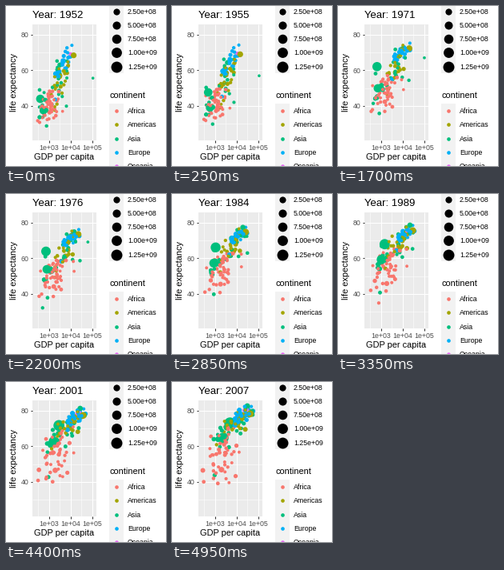
A matplotlib script that plays this animation: 200x200 px, repeating every 5000 ms.

```python
import numpy as np
import matplotlib.pyplot as plt
from matplotlib.animation import FuncAnimation
from matplotlib.patches import Rectangle

plt.rcParams["font.family"] = "Liberation Sans"

SIZE, DPI = 200, 100
PT = 72 / DPI                        # points per pixel
FRAMES, INTERVAL = 100, 50
YEARS = np.arange(1952, 2008, 5)
LEFT, RIGHT, TOP, BOTTOM = 33.3, 112.8, 23.4, 168.1
COLOURS = {"Africa": "#F8766D", "Americas": "#A3A500", "Asia": "#00BF7D",
           "Europe": "#00B0F6", "Oceania": "#E76BF3"}
POP_MIN, POP_MAX = 0.06, 1318.7      # millions

# Countries with an uneven course: GDP and life expectancy every five years,
# then the first and last population in millions.
PATHS = {
    "China": ("Asia",
              [400, 576, 488, 613, 677, 741, 962, 1379, 1656, 2289, 3119, 4959],
              [44, 50.5, 44.5, 58.4, 63.1, 64, 65.5, 67.3, 68.7, 70.4, 72, 73],
              556, 1318.7),
    "India": ("Asia",
              [547, 590, 658, 701, 724, 813, 856, 977, 1164, 1459, 1747, 2452],
              [37.4, 40.2, 43.6, 47.2, 50.7, 54.2, 56.6, 58.6, 60.2, 61.8, 62.9, 64.7],
              372, 1110),
    "Kuwait": ("Asia",
               [108382, 113523, 95458, 80895, 109348, 59265, 31354, 28118,
                34933, 40301, 35110, 47307],
               [55.6, 58, 60.5, 64.6, 67.7, 69.3, 71.3, 74.2, 75.2, 76.2, 76.9, 77.6],
               0.16, 2.5),
    "Cambodia": ("Asia",
                 [368, 434, 497, 523, 422, 525, 624, 684, 682, 734, 896, 1714],
                 [39.4, 41.4, 43.4, 45.4, 40.3, 31.2, 51, 53.9, 55.8, 56.5, 56.8, 59.7],
                 4.7, 14),
    "Rwanda": ("Africa",
               [493, 540, 597, 511, 591, 670, 882, 848, 737, 590, 786, 863],
               [40, 41.5, 43, 44.1, 44.6, 45, 46.2, 44, 23.6, 36.1, 43.4, 46.2],
               2.5, 8.9),
}

# Steadier countries: GDP and life expectancy in 1952, 1980 and 2007, population.
STEADY = {
    "Afghanistan": ("Asia", [779, 880, 975], [28.8, 39.2, 43.8], 8.4, 32),
    "Bangladesh": ("Asia", [684, 670, 1391], [37.5, 49, 64], 47, 150),
    "Indonesia": ("Asia", [750, 1450, 3541], [37.5, 55, 70.6], 82, 224),
    "Iraq": ("Asia", [4130, 14600, 4471], [45.3, 61.3, 59.5], 5.4, 27),
    "Japan": ("Asia", [3217, 18300, 31656], [63, 76.5, 82.6], 86, 127),
    "Pakistan": ("Asia", [685, 1350, 2606], [43.4, 55.5, 65.5], 41, 169),
    "Saudi Arabia": ("Asia", [6460, 33800, 21655], [39.9, 61.4, 72.8], 4, 28),
    "Singapore": ("Asia", [2315, 13500, 47143], [60.4, 71.4, 80], 1.1, 4.6),
    "Brazil": ("Americas", [2108, 6900, 9066], [50.9, 62.7, 72.4], 57, 190),
    "Haiti": ("Americas", [1840, 1950, 1202], [37.6, 51, 60.9], 3.2, 8.5),
    "Mexico": ("Americas", [3478, 8800, 11978], [50.8, 66.5, 76.2], 30, 109),
    "United States": ("Americas", [13990, 24700, 42952], [68.4, 74.2, 78.2], 157, 301),
    "Congo": ("Africa", [781, 730, 278], [39.1, 47.8, 46.5], 14, 65),
    "Gabon": ("Africa", [4293, 17500, 13206], [37, 55, 56.7], 0.4, 1.5),
    "Libya": ("Africa", [2388, 17300, 12057], [42.7, 60.5, 74], 1, 6),
    "Nigeria": ("Africa", [1077, 1800, 2014], [36.3, 45.3, 46.9], 33, 135),
    "Swaziland": ("Africa", [1148, 3850, 4513], [41.4, 54.5, 39.6], 0.3, 1.1),
    "Turkey": ("Europe", [1969, 4250, 8458], [43.6, 60.5, 71.8], 22, 71),
}

# The rest: count, correlation, median population, then mean and spread of
# log GDP and of life expectancy at four epochs.
EPOCHS = [1952, 1970, 1988, 2007]
CROWDS = {
    "Africa": (46, 0.4, 3, [2.97, 3.15, 3.2, 3.24], [.27, .33, .37, .42],
               [39.3, 46.5, 54, 55], [5, 5.8, 7, 9.3]),
    "Americas": (21, 0.7, 4, [3.5, 3.66, 3.75, 3.92], [.22, .22, .25, .27],
                 [54, 61.5, 69, 74], [8.5, 7.5, 5, 3.5]),
    "Asia": (21, 0.75, 8, [3.2, 3.42, 3.66, 3.85], [.35, .38, .45, .5],
             [49, 57, 66.5, 72.5], [9, 8, 6, 5]),
    "Europe": (29, 0.8, 10, [3.7, 3.98, 4.17, 4.35], [.22, .2, .2, .23],
               [65, 70.3, 73.8, 77.8], [5, 2.6, 2.4, 2.7]),
    "Oceania": (2, 0.8, 6, [4.01, 4.19, 4.27, 4.47], [.01, .02, .04, .07],
                [69.2, 71.5, 75.3, 80.7], [.2, .3, .6, .5]),
}


def x_px(log_gdp):
    return LEFT + (np.asarray(log_gdp) - 2.249) * (RIGHT - LEFT) / 2.940


def y_px(life):
    return TOP + (85.55 - np.asarray(life)) * (BOTTOM - TOP) / 64.90


def pop_size(pop):
    share = (np.asarray(pop) - POP_MIN) / (POP_MAX - POP_MIN)
    return 1 + 5 * np.sqrt(np.clip(share, 0, 1))


def area(size):
    """Marker area in square points for a point size in millimetres."""
    diameter = 0.75 * (2.845 * size + 0.945) + 0.7
    return (diameter * PT) ** 2


def country(order, continent, years, log_gdp, life, pop0, pop1):
    pop = np.geomspace(pop0, pop1, len(YEARS))
    return (order, COLOURS[continent], np.interp(YEARS, years, log_gdp),
            np.interp(YEARS, years, life), pop_size(pop))


def build_world():
    rng = np.random.default_rng(11)
    world = []
    for table, years in ((PATHS, YEARS), (STEADY, [1952, 1980, 2007])):
        for name, (continent, gdp, life, pop0, pop1) in table.items():
            order = (ord(name[0]) - ord("A")) / 26
            world.append(country(order, continent, years, np.log10(gdp),
                                 life, pop0, pop1))
    for continent, (n, corr, pop, gm, gs, lm, ls) in CROWDS.items():
        for _ in range(n):
            zg = rng.normal()
            zl = corr * zg + np.sqrt(1 - corr ** 2) * rng.normal()
            gdp, life = [], []
            for k in range(len(EPOCHS)):
                gdp.append(max(2.42, gm[k] + gs[k] * np.clip(zg, -1.8, 1.8)))
                life.append(min(82.3, lm[k] + ls[k] * np.clip(zl, -1.7, 1.8)))
                zg = 0.95 * zg + 0.3 * rng.normal()
                zl = 0.92 * zl + 0.35 * rng.normal()
            pop0 = pop * np.exp(0.9 * np.clip(rng.normal(), -2, 2))
            growth = 1.3 if continent == "Europe" else 2.8
            world.append(country(rng.random(), continent, EPOCHS, gdp, life,
                                 pop0, pop0 * growth))
    world.sort(key=lambda c: c[0])
    _, colours, gdp, life, size = zip(*world)
    return colours, np.array(gdp), np.array(life), np.array(size)


def label(x, y, text, size, colour="black", **kw):
    return ax.text(x, y, text, fontsize=size * PT, color=colour, **kw)


def line(xs, ys, width, colour, z):
    ax.plot(xs, ys, color=colour, lw=width * PT, zorder=z,
            solid_capstyle="butt")


def box(x, y, w, h, colour):
    ax.add_patch(Rectangle((x, y), w, h, fc=colour, lw=0, zorder=0))


def draw_panel():
    box(LEFT, TOP, RIGHT - LEFT, BOTTOM - TOP, "#EBEBEB")
    for value in range(30, 81, 10):
        y, major = y_px(value), value % 20 == 0
        line([LEFT, RIGHT], [y, y], 1.07 if major else 0.53, "white", 1)
        if major:
            line([LEFT - 2.75, LEFT], [y, y], 1.07, "#333333", 1)
            label(LEFT - 4.95, y + 3.15, str(value), 8.8, "#4D4D4D", ha="right")
    for value in np.arange(2.5, 5.1, 0.5):
        x, major = x_px(value), value % 1 == 0
        line([x, x], [TOP, BOTTOM], 1.07 if major else 0.53, "white", 1)
        if major:
            line([x, x], [BOTTOM, BOTTOM + 2.75], 1.07, "#333333", 1)
            label(x, 179.7, f"1e+{int(value):02d}", 8.8, "#4D4D4D", ha="center")
    label((LEFT + RIGHT) / 2, 192.2, "GDP per capita", 11, ha="center")
    label(13.5, (TOP + BOTTOM) / 2, "life expectancy", 11, ha="center",
          rotation=90, rotation_mode="anchor")


def draw_legend(first_y, rows):
    key, x = 17.28, 129.3
    for k, (text, size, colour) in enumerate(rows):
        y = first_y + k * key
        box(x, y - key / 2, key, key, "#F2F2F2")
        ax.scatter(x + key / 2, y, s=area(size), c=colour, lw=0, zorder=3)
        label(x + key + 5.5, y + 3.15, text, 8.8)


fig = plt.figure(figsize=(SIZE / DPI, SIZE / DPI), dpi=DPI, facecolor="white")
ax = fig.add_axes([0, 0, 1, 1])
ax.set_xlim(0, SIZE)
ax.set_ylim(SIZE, 0)
ax.axis("off")

draw_panel()
draw_legend(6.5, [(f"{p * 1e6:.2e}", pop_size(p), "black")
                  for p in range(250, 1251, 250)])
label(129.3, 114.9, "continent", 11)
draw_legend(131, [(name, 1.5, colour) for name, colour in COLOURS.items()])

colours, gdp, life, size = build_world()
title = label(LEFT, 15.2, "", 13.2)
dots = ax.scatter(x_px(gdp[:, 0]), y_px(life[:, 0]), s=area(size[:, 0]),
                  c=colours, lw=0, zorder=3)


def update(frame):
    step = frame / (FRAMES - 1) * (len(YEARS) - 1)
    k = min(int(step), len(YEARS) - 2)
    t = step - k

    def at(values):
        return values[:, k] * (1 - t) + values[:, k + 1] * t

    dots.set_offsets(np.column_stack([x_px(at(gdp)), y_px(at(life))]))
    dots.set_sizes(area(at(size)))
    title.set_text(f"Year: {round(1952 + 5 * step)}")
    return dots, title


anim = FuncAnimation(fig, update, frames=FRAMES, interval=INTERVAL,
                     init_func=lambda: update(0), repeat=True)
plt.show()
```
